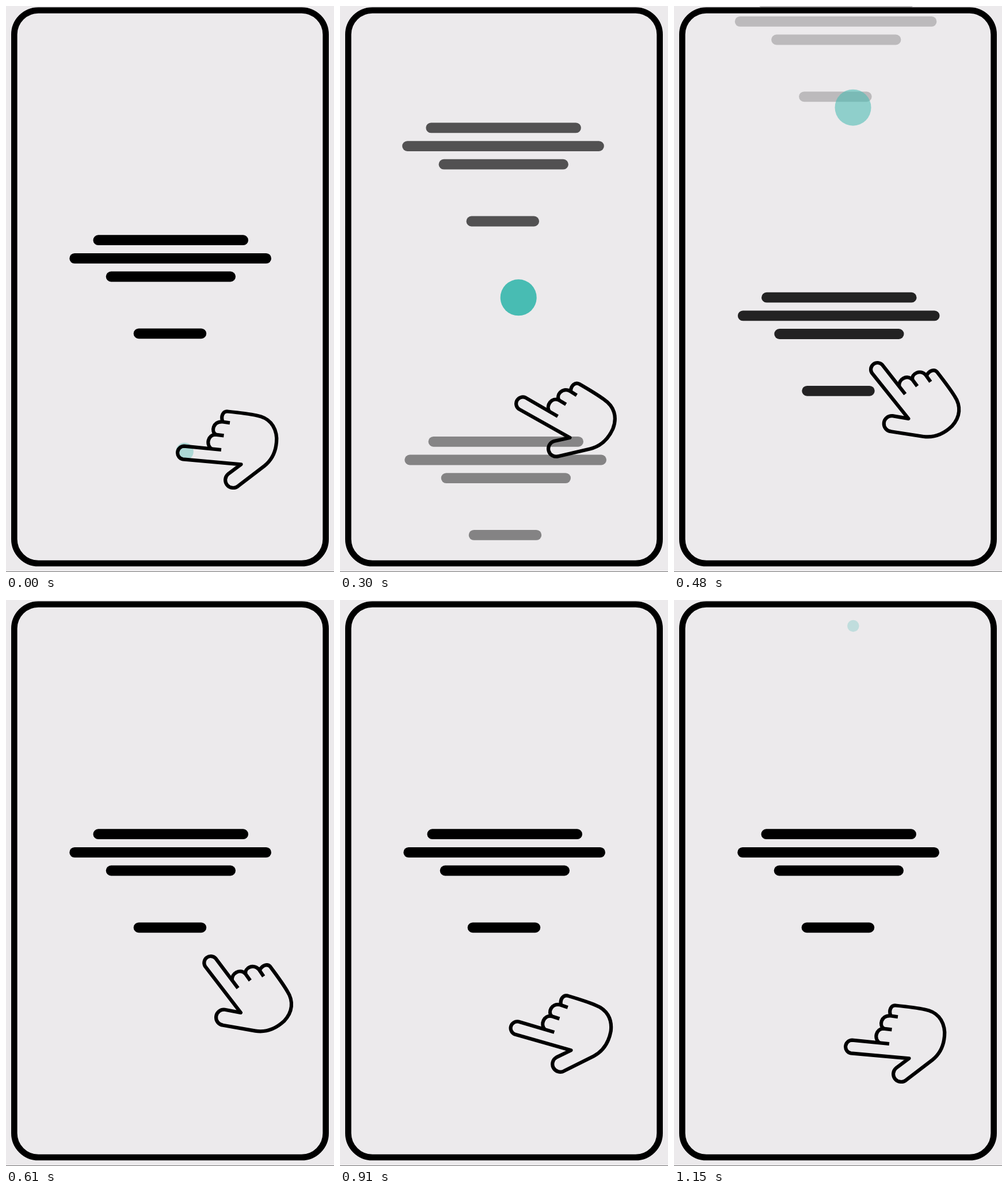
Animation, 570 px wide and 982 px high, one loop 1.18 s. Source, as an HTML page:

```html
<!DOCTYPE html>
<html lang="en">
<head>
<meta charset="utf-8">
<title>Swipe up</title>
<style>
  html, body { margin: 0; width: 100%; height: 100%; overflow: hidden; background: #eceaec; }
  svg { display: block; width: 100%; height: 100%; }
</style>
</head>
<body>
<svg viewBox="0 0 570 982">
  <defs>
    <g id="lines">
      <rect x="151.5" y="397.3" width="269.5" height="17.8" rx="8.9"/>
      <rect x="110.3" y="429" width="350.7" height="17.8" rx="8.9"/>
      <rect x="173.7" y="460.6" width="225.3" height="17.8" rx="8.9"/>
      <rect x="221.7" y="559.4" width="126.5" height="17.8" rx="8.9"/>
    </g>
  </defs>
  <rect width="570" height="982" fill="#eceaec"/>
  <use id="leaving" href="#lines"/>
  <use id="arriving" href="#lines"/>
  <rect x="14.3" y="7.5" width="541.4" height="959.5" rx="42" fill="none" stroke="#000" stroke-width="10.6"/>
  <rect y="981" width="570" height="1" fill="#777"/>
  <circle id="dot" fill="#48bcb3"/>
  <g id="hand" fill="none" stroke="#000" stroke-width="6.2" stroke-linejoin="round">
    <path d="M374 770 L309.5 763.6 A11.5 11.5 0 0 0 307.5 786.4 L408.5 795.3
      L386 812 A13.5 13.5 0 0 0 403.5 832.8 L449 798
      C464 786 470.3 768 470.3 750 C469 728 456 714 436 710.5
      Q420 707 385 703.5 C377 703 373 712 376.5 721"/>
    <path d="M389 723.3 L375 721.3 C360 721 356 738 364.5 743.5"/>
    <path d="M378.5 745.3 L364 743.6 C351 744 347 761 357 768.3"/>
  </g>
</svg>
<script>
const LOOP = 1180;
const el = id => document.getElementById(id);
const clamp = v => Math.max(0, Math.min(1, v));

// Rows: time, value, ...
const scroll = [[150, 0], [180, .044], [300, .392], [480, .827], [550, 1]];
const pose = [ // time, anchor x, anchor y, turn in degrees
  [130, 409, 795, 0], [180, 407, 786, 1.6], [300, 400, 749, 24.3],
  [480, 408, 716, 46.2], [550, 410, 714, 48.7], [580, 410, 714, 48.7],
  [730, 395, 744, 31], [910, 402, 781, 10.8], [1150, 409, 795, 0]
];

// Slope at a row: harmonic mean of both sides, flat at turning points and ends.
function slope(rows, i, c) {
  if (i === 0 || i === rows.length - 1) return 0;
  const rate = k => (rows[k + 1][c] - rows[k][c]) / (rows[k + 1][0] - rows[k][0]);
  const a = rate(i - 1), b = rate(i);
  return a * b <= 0 ? 0 : 2 * a * b / (a + b);
}

function sample(rows, t, c = 1) {
  const last = rows.length - 1;
  if (t <= rows[0][0]) return rows[0][c];
  if (t >= rows[last][0]) return rows[last][c];
  const i = rows.findIndex(r => r[0] > t) - 1;
  const [a, b] = [rows[i], rows[i + 1]];
  const span = b[0] - a[0], u = (t - a[0]) / span, v = 1 - u;
  return a[c] * v * v * (1 + 2 * u) + b[c] * u * u * (3 - 2 * u)
    + span * u * v * (slope(rows, i, c) * v - slope(rows, i + 1, c) * u);
}

// The picture advances in 30 ms steps, with one longer hold.
function step(t) {
  if (t < 480) return Math.floor(t / 30) * 30;
  return t < 520 ? 480 : 520 + Math.floor((t - 520) / 30) * 30;
}

function place(node, dx, dy, strength) {
  node.setAttribute('transform', `translate(${dx} ${dy})`);
  node.setAttribute('opacity', clamp(strength + .18 * strength * (1 - strength)));
}

function drawDot(t, p) {
  const s = t > 1050 ? t - LOOP : t; // the press begins just before the loop ends
  const fade = 1 - clamp((s - 300) / 250) ** 2.5;
  const dot = el('dot');
  dot.setAttribute('cx', p > 0 ? 309.4 + 2 * p : 310.5);
  dot.setAttribute('cy', Math.min(773, 803 - 758 * p));
  dot.setAttribute('r', 31.5 * clamp((s + 90) / 185));
  dot.setAttribute('opacity', clamp(.38 + .0038 * s) * fade);
}

function draw(time) {
  const t = step(time % LOOP);
  const p = sample(scroll, t);
  place(el('leaving'), -5.5 * p, -497 * p, 1 - p);
  place(el('arriving'), 3.3 * (1 - p), 575 * (1 - p), p);
  drawDot(t, p);
  const [x, y, turn] = [1, 2, 3].map(c => sample(pose, t, c));
  el('hand').setAttribute('transform', `translate(${x} ${y}) rotate(${turn}) translate(-409 -795)`);
}

const start = performance.now();
function tick() {
  draw(performance.now() - start);
  requestAnimationFrame(tick);
}
tick();
</script>
</body>
</html>
```
